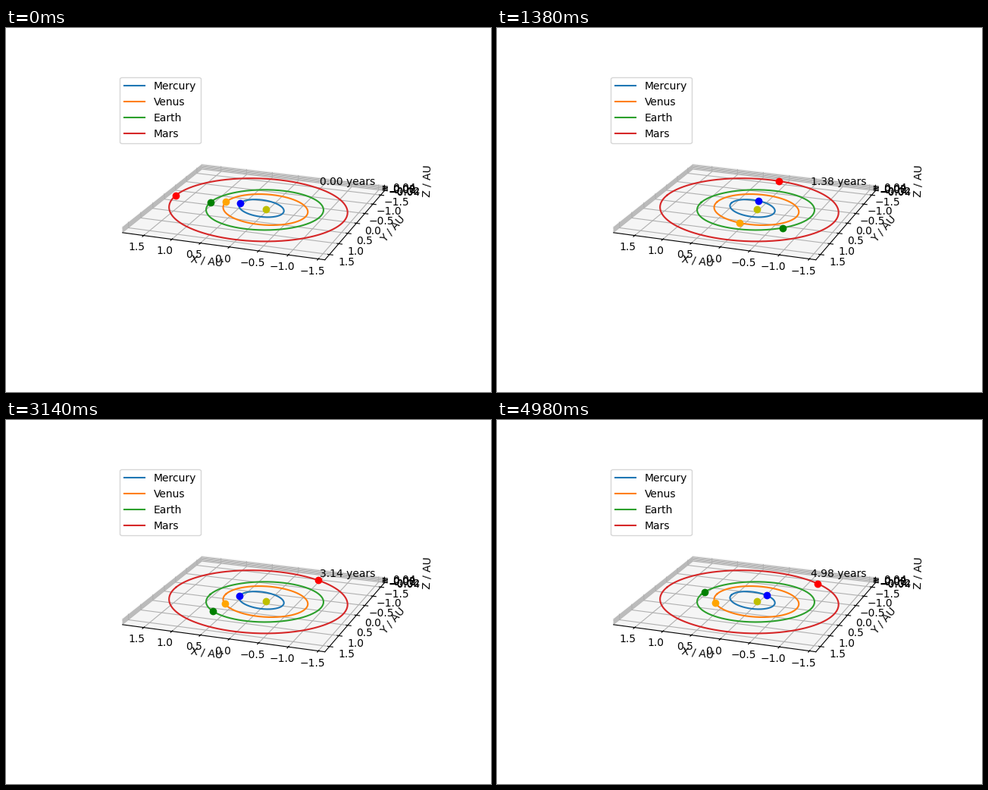
Recreate the animation shown at these times as a matplotlib script. Size 640x480 px, loop 5000 ms.

```python
import numpy as np
import matplotlib.pyplot as plt
from matplotlib.animation import FuncAnimation

FRAMES, STEP = 250, 0.02  # frames per loop, years per frame

# name, semi-major axis (AU), eccentricity, tilt (deg), period (yr), dot colour
PLANETS = [
    ("Mercury", 0.387, 0.21, 7.00, 0.241, "blue"),
    ("Venus", 0.723, 0.01, 3.39, 0.615, "orange"),
    ("Earth", 1.000, 0.02, 0.00, 1.000, "green"),
    ("Mars", 1.523, 0.09, 1.85, 1.881, "red"),
]


def orbit(theta, a, ecc, tilt):
    """Point on a tilted ellipse, with aphelion at theta = 0."""
    r = a * (1 - ecc**2) / (1 - ecc * np.cos(theta))
    x, y = r * np.cos(theta), r * np.sin(theta)
    b = np.radians(tilt)
    return x * np.cos(b), y, x * np.sin(b)


def angle(t, ecc, period):
    """Polar angle at time t, starting from aphelion."""
    mean = 2 * np.pi * t / period
    e = mean
    for _ in range(30):
        e -= (e + ecc * np.sin(e) - mean) / (1 + ecc * np.cos(e))
    return 2 * np.arctan2(np.sqrt(1 - ecc) * np.sin(e / 2),
                          np.sqrt(1 + ecc) * np.cos(e / 2))


fig = plt.figure(figsize=(6.4, 4.8), dpi=100)
ax = fig.add_subplot(projection="3d")
ax.view_init(elev=20, azim=110)

theta = np.linspace(0, 2 * np.pi, 400)
for name, a, ecc, tilt, *_ in PLANETS:
    ax.plot(*orbit(theta, a, ecc, tilt), label=name)
ax.plot([0], [0], [0], "yo")
dots = [ax.plot([0], [0], [0], "o", color=p[-1])[0] for p in PLANETS]

ax.set_xlabel("X / AU")
ax.set_ylabel("Y / AU")
ax.set_zlabel("Z / AU")
ax.set_aspect("equal")
ax.legend(loc="upper left")
clock = fig.text(414 / 640, 273 / 480, "")


def update(i):
    t = i * STEP
    for dot, (_, a, ecc, tilt, period, _) in zip(dots, PLANETS):
        x, y, z = orbit(angle(t, ecc, period), a, ecc, tilt)
        dot.set_data_3d([x], [y], [z])
    clock.set_text(f"{t:.2f} years")
    return [*dots, clock]


anim = FuncAnimation(fig, update, frames=FRAMES, interval=20, repeat=True)
plt.show()
```
